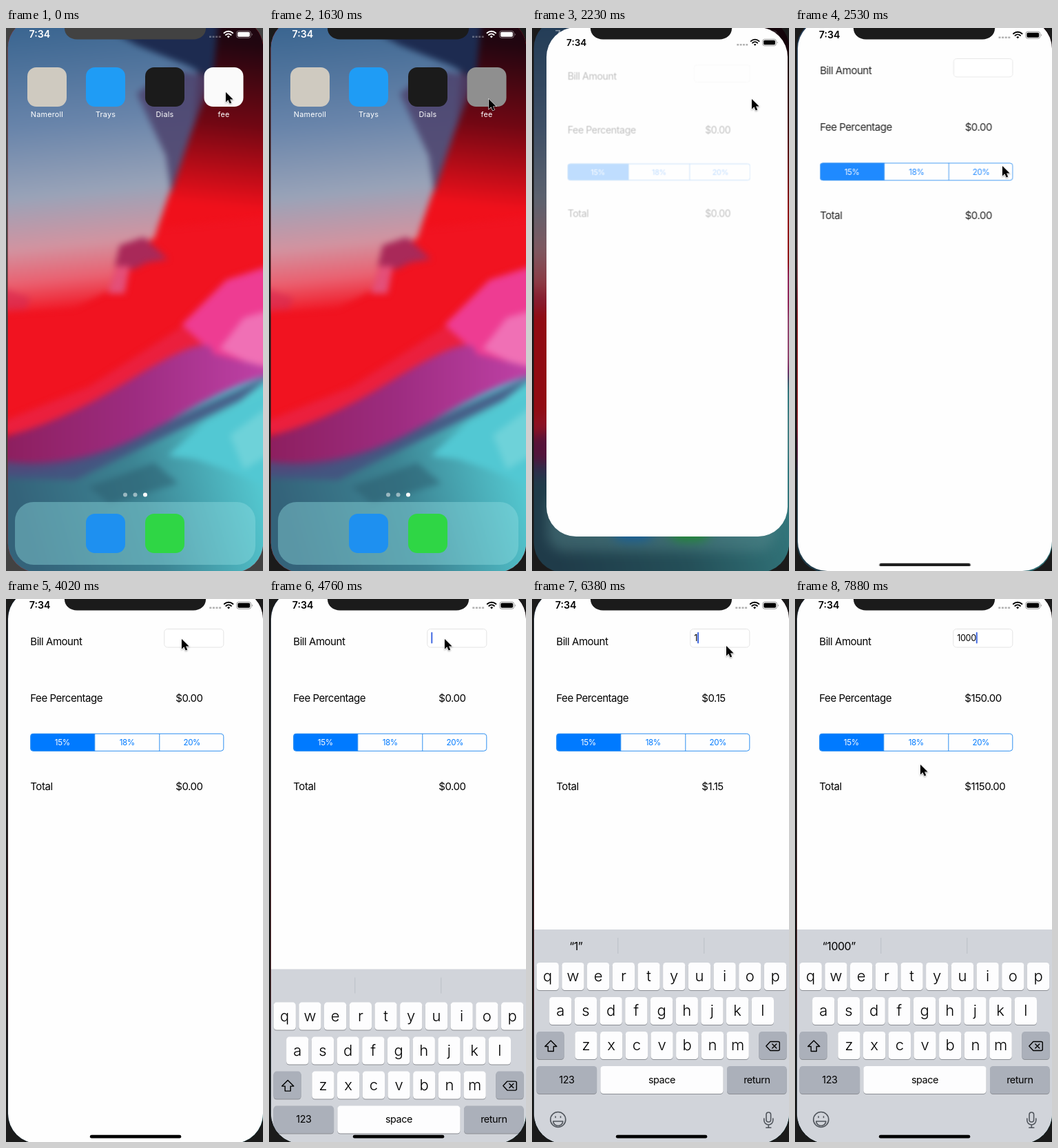
Recreate the animation shown at these times as an HTML page. Size 373 by 787 pixels, loop 8000 ms.

```html
<!DOCTYPE html>
<html lang="en">
<head>
<meta charset="utf-8">
<title>Phone demo</title>
<style>
  html, body { margin: 0; width: 100%; height: 100%; overflow: hidden; }
  body { position: relative; background: #424242; --bezel: #424242; }
  body.active { background: #1b1b1b; --bezel: #1b1b1b; }
  svg { position: absolute; left: 0; top: 0; overflow: visible; }
  text { font-family: Inter, Roboto, sans-serif; letter-spacing: -.03em; }
  .mid { text-anchor: middle; }
  #screen { position: absolute; inset: 0; clip-path: inset(-14px -.3px -2px 2.7px round 43px); }
  #icons { transform-origin: 188px 387px; }
  #icons text { font-size: 10.8px; fill: #fff; letter-spacing: .02em; }
  .soft { filter: blur(5px); }
  .open #wall { filter: blur(7px) brightness(.6); }
  .open #icons { filter: blur(9px) brightness(.65); transform: scale(.95); }
  .open #homeStatus { opacity: .45; }
  #app { position: absolute; overflow: hidden; background: #fefefe; border-radius: 43px; }
  #page { position: absolute; left: 0; top: 0; transform-origin: 0 0; }
  .form { font-size: 15px; }
  .seg { font-size: 11.6px; fill: #007aff; }
  .key { font-size: 22px; font-weight: 300; letter-spacing: 0; }
  .word { font-size: 14.4px; }
  .line { fill: none; stroke-linecap: round; stroke-linejoin: round; }
  #notch { fill: var(--bezel); }
  #pointer { filter: drop-shadow(0 1.5px 1px rgba(0, 0, 0, .35)); }
</style>
</head>
<body>
<div id="screen">
  <svg id="home" width="373" height="787">
    <defs>
      <linearGradient id="sky" gradientUnits="userSpaceOnUse" x1="0" y1="0" x2="40" y2="410">
        <stop stop-color="#3a6590"/>
        <stop offset=".35" stop-color="#6884aa"/>
        <stop offset=".6" stop-color="#99a3b8"/>
        <stop offset=".78" stop-color="#d293a0"/>
        <stop offset=".9" stop-color="#ea6070"/>
        <stop offset="1" stop-color="#f01c2a"/>
      </linearGradient>
      <linearGradient id="night" gradientUnits="userSpaceOnUse" x1="345" y1="20" x2="320" y2="260">
        <stop stop-color="#200610"/>
        <stop offset=".5" stop-color="#710713"/>
        <stop offset="1" stop-color="#f0101b"/>
      </linearGradient>
      <linearGradient id="violet" x2="1" y2="0">
        <stop stop-color="#8a1c58"/>
        <stop offset=".5" stop-color="#9d2c80"/>
        <stop offset="1" stop-color="#c545ad"/>
      </linearGradient>
      <linearGradient id="sea" gradientUnits="userSpaceOnUse" x1="20" y1="700" x2="360" y2="600">
        <stop stop-color="#34637a"/>
        <stop offset=".5" stop-color="#3c8493"/>
        <stop offset="1" stop-color="#55cbd3"/>
      </linearGradient>
    </defs>
    <g id="wall">
      <path fill="#f11320" d="M-40-40H413V827H-40z"/>
      <g class="soft">
        <path fill="url(#sky)" d="M-40-40H310L275 130 242 225 215 305 165 325 150 380 100 405-40 415z"/>
        <path fill="url(#night)" d="M290-40H413V270L220 290 245 220 272 140z"/>
        <path fill="#1d2b50" d="M90-30H310L300 75 265 55 190 25z"/>
        <path fill="#4d426d" d="M190 95L235 60 300 70 270 150 240 240 232 185z" opacity=".85"/>
        <path fill="#a92959" d="M158 345L165 315 200 303 235 335 205 340 185 350z"/>
        <path fill="#e44f78" d="M148 385L160 345 180 345 172 385z"/>
        <path fill="#d82852" d="M-10 375L35 390 30 408-10 410z" opacity=".6"/>
        <path fill="#e9254b" d="M-40 585L120 520 260 430 413 340V500L180 545 60 590z" opacity=".7"/>
        <path fill="#ee3c92" d="M255 430L320 365 413 335V530L320 490z"/>
        <path fill="#f070b5" d="M310 465L345 420 413 400V515z"/>
        <path fill="url(#violet)" d="M-40 600Q60 585 180 510T300 472L413 500V545L200 630 60 650-40 640z"/>
        <path fill="url(#sea)" d="M-40 640Q90 660 220 580T413 500V827H-40z"/>
        <path fill="#46507f" d="M-40 622Q90 652 220 578L390 500 340 540 225 595 100 655-40 652z" opacity=".85"/>
        <path fill="#52c8d3" d="M235 620L290 570 413 515V680L320 640 275 625z"/>
        <path fill="#7bd7dc" d="M325 590L413 525V600L345 640z" opacity=".7"/>
        <path fill="#2c5d70" d="M120 665L215 630 250 660 150 690z" opacity=".55"/>
      </g>
    </g>
    <g id="icons">
      <rect x="13" y="687" width="349" height="91" rx="27" fill="#8fdbe0" opacity=".42"/>
      <g id="dots" fill="#fff">
        <circle cx="173" cy="676.5" r="3" opacity=".5"/>
        <circle cx="187.5" cy="676.5" r="3" opacity=".5"/>
        <circle cx="202" cy="676.5" r="3"/>
      </g>
    </g>
    <g id="homeStatus" fill="#fff" stroke="#fff"></g>
  </svg>

  <div id="app">
    <svg id="page" width="373" height="787">
      <g id="appStatus" fill="#000" stroke="#000"></g>
      <g id="content">
        <g class="form">
          <text x="35" y="66.5">Bill Amount</text>
          <text x="35" y="148.5">Fee Percentage</text>
          <text x="35" y="276.5">Total</text>
          <text id="fee" x="246" y="148.5"></text>
          <text id="total" x="246" y="276.5"></text>
        </g>
        <rect x="229.5" y="43.5" width="86" height="26.5" rx="4.5" fill="#fff" stroke="#e4e4e4"/>
        <text id="bill" x="235" y="61" font-size="12.6"></text>
        <rect id="caret" y="48" width="2" height="16.5" rx="1" fill="#4169e1"/>
        <path d="M128.5 195H39a4 4 0 0 0-4 4v17.500a4 4 0 0 0 4 4h89.500z" fill="#007aff"/>
        <rect x="35.500" y="195.300" width="280" height="25" rx="4" fill="none" stroke="#2f8ff0"/>
        <path d="M128.500 195v25.500M222.500 195v25.500" stroke="#2f8ff0"/>
        <g class="seg mid">
          <text x="81.500" y="212" style="fill:#fff">15%</text>
          <text x="175.500" y="212">18%</text>
          <text x="269.500" y="212">20%</text>
        </g>
        <g id="keyboard">
          <path d="M0 479H374V800H0z" fill="#d1d4da"/>
          <path d="M124.500 491v23M249.500 491v23" stroke="#bbbfc6"/>
          <text id="guess" class="mid" x="63.500" y="509" font-size="16"></text>
          <g id="keys"></g>
          <g class="line" stroke="#000" stroke-width="1.400">
            <path d="M27 640l8.500 8.500h-4.500v7h-8v-7h-4.500z"/>
            <path d="M339.500 648l6-6.500h11.500a2 2 0 0 1 2 2v9a2 2 0 0 1-2 2h-11.500zM348.500 645l6 6m0-6l-6 6"/>
          </g>
          <g class="line" stroke="#50555c" stroke-width="1.600">
            <circle cx="37.500" cy="754.500" r="11"/>
            <path d="M30.500 757h14a7 6.500 0 0 1-14 0zM33.800 750v1.500M41.200 750v1.500"/>
            <rect x="339.700" y="744" width="6.600" height="14" rx="3.300"/>
            <path d="M336.500 753v2.500a6.500 6.500 0 0 0 13 0V753M343 762v4M339.500 766.300h7"/>
          </g>
        </g>
        <rect x="121.500" y="776.800" width="132.500" height="4.700" rx="2.350"/>
      </g>
    </svg>
  </div>
</div>

<svg width="373" height="787">
  <path id="notch" d="M78-2q7 0 7 3a18 15.500 0 0 0 18 15.500h169a18 15.500 0 0 0 18-15.500q0-3 7-3z"/>
  <path id="pointer" d="M0 0v14.500l3.400-3.200 2.300 5.300 2.500-1.100-2.200-5.100h4.600z" stroke="#fff" stroke-width="1.100" paint-order="stroke"/>
</svg>

<script>
const $ = id => document.getElementById(id);
const LOOP = 8000, LEAD = 137, STEP = 148.8;   // the screen refreshes once per STEP
const add = (id, html) => $(id).insertAdjacentHTML('beforeend', html);

// Status bar, shared by the home screen and the app
const status = `
  <text x="33.500" y="14.300" font-size="14.200" font-weight="600" stroke="none" style="letter-spacing:0">7:34</text>
  <path d="M295 12.800h3m1.600 0h3m1.600 0h3m1.600 0h3" stroke-width="2.600" opacity=".3"/>
  <path class="line" d="M316.500 7.300a9 9 0 0 1 12.600 0M319 10a5.500 5.500 0 0 1 7.600 0" stroke-width="1.900"/>
  <path d="M320.800 12.200l2 2.200 2-2.200a3 3 0 0 0-4 0z" stroke="none"/>
  <rect x="334.500" y="4.300" width="20.800" height="10" rx="3" fill="none" opacity=".4"/>
  <rect x="336" y="5.800" width="17.800" height="7" rx="1.700" stroke="none"/>
  <path d="M356.800 7.700q2 1.600 0 3.200z" stroke="none" opacity=".45"/>`;
add('homeStatus', status);
add('appStatus', status);

function icon(x, y, fill, label = '', id = '') {
  add('icons', `<rect id="${id}" x="${x}" y="${y}" width="57" height="57" rx="13" fill="${fill}"/>
    <text class="mid" x="${x + 28.5}" y="${y + 71.5}">${label}</text>`);
}
icon(31, 57, '#cfcac0', 'Nameroll');
icon(116, 57, '#1f9cf5', 'Trays');
icon(202, 57, '#1b1b1b', 'Dials');
icon(287.5, 57, '#fafafa', 'fee', 'launch');
icon(116, 704, '#1e90f0');
icon(202, 704, '#2fd645');

function key(x, y, w, label, type = 'key', fill = '#fdfdfe') {
  const rect = (dy, color) =>
    `<rect x="${x}" y="${y + dy}" width="${w}" height="40" rx="4.500" fill="${color}"/>`;
  add('keys', rect(1, '#8b8e94') + rect(0, fill) +
    `<text class="mid ${type}" x="${x + w / 2}" y="${y + (type === 'key' ? 27 : 24.8)}">${label}</text>`);
}
const GREY = '#abb0ba';
[['qwertyuiop', 6.3], ['asdfghjkl', 24.8], ['zxcvbnm', 62]].forEach(([row, x0], r) =>
  [...row].forEach((c, i) => key(x0 + i * 36.7, 527 + r * 50, 32.3, c)));
key(6.3, 627, 40, '', 'word', GREY);
key(329, 627, 40.3, '', 'word', GREY);
key(6.3, 677, 87.5, '123', 'word', GREY);
key(99, 677, 178.3, 'space', 'word');
key(282.7, 677, 86.6, 'return', 'word', GREY);

// Pointer path: [step, x, y]
const path = [
  [-1, 319, 93], [0, 320, 107], [1, 322, 123], [2, 320, 112], [3, 319, 103], [14, 319, 103],
  [16, 301, 200], [17, 296, 214], [19, 288, 221], [20, 270, 227], [21, 215, 222], [22, 173, 196],
  [23, 190, 140], [24, 222, 90], [25, 248, 64], [26, 255, 58], [31, 255, 58], [33, 279, 65],
  [34, 282, 68], [50, 282, 68], [51, 240, 150], [52, 182, 240]
];
function pointerAt(n) {
  const i = path.findIndex(p => p[0] >= n);
  if (i <= 0) return path[0].slice(1);
  const [n0, x0, y0] = path[i - 1], [n1, x1, y1] = path[i];
  const k = (n - n0) / (n1 - n0);
  return [x0 + (x1 - x0) * k, y0 + (y1 - y0) * k];
}

const OPEN = 13, FOCUS = 30, TYPE = 40;
const clamp = (v, a, b) => Math.min(b, Math.max(a, v));
const typed = n => '1000'.slice(0, clamp(Math.floor((n - TYPE) / 2) + 1, 0, 4));
const money = v => '$' + v.toFixed(2);

function caretAlpha(n) {
  if (n < FOCUS || n === 36 || n === 37) return 0;
  if (n === 48 || n === 51) return .5;
  return n === 49 || n === 50 ? 0 : 1;
}

function drawApp(n) {
  const app = $('app');
  app.style.display = n < OPEN ? 'none' : 'block';
  if (n < OPEN) return;

  // The window grows out of the icon; its height trails its width
  const rest = n > 16 ? 0 : .22 ** (n - OPEN);
  const mix = (from, to, lag) => to + (from - to) * lag * rest;
  const w = mix(57, 370.6, .293), h = mix(57, 803, .394);
  Object.assign(app.style, {
    left: mix(316, 188, .291) - w / 2 + 'px',
    top: mix(85.5, 387.5, .291) - h / 2 + 'px',
    width: w + 'px',
    height: h + 'px'
  });
  $('page').style.transform = `scale(${w / 370.6}) translate(-2.7px, 14px)`;
  $('content').style.opacity = [0, .25, .6, .88][n - OPEN] ?? 1;

  const text = typed(n), bill = +text, guess = typed(n - 1);
  $('bill').textContent = text;
  $('fee').textContent = money(bill * .15);
  $('total').textContent = money(bill * 1.15);
  $('guess').textContent = guess && `“${guess}”`;
  $('caret').setAttribute('x', 235 + (text ? $('bill').getComputedTextLength() : 0));
  $('caret').style.opacity = caretAlpha(n);

  const drop = n < FOCUS ? 330 : n > 33 ? 0 : 308 * .187 ** (n - FOCUS);
  $('keyboard').setAttribute('transform', `translate(0 ${drop})`);
}

function draw(n) {
  document.body.classList.toggle('active', n >= 10);
  $('home').classList.toggle('open', n >= OPEN);
  $('launch').setAttribute('fill', n >= 10 ? '#8f8f8f' : '#fafafa');
  drawApp(n);
  $('pointer').setAttribute('transform', `translate(${pointerAt(n)})`);
}

const start = performance.now();
let shown;
function frame() {
  const n = Math.floor(((performance.now() - start) % LOOP - LEAD) / STEP);
  if (n !== shown) draw(shown = n);
  requestAnimationFrame(frame);
}
frame();
</script>
</body>
</html>
```
